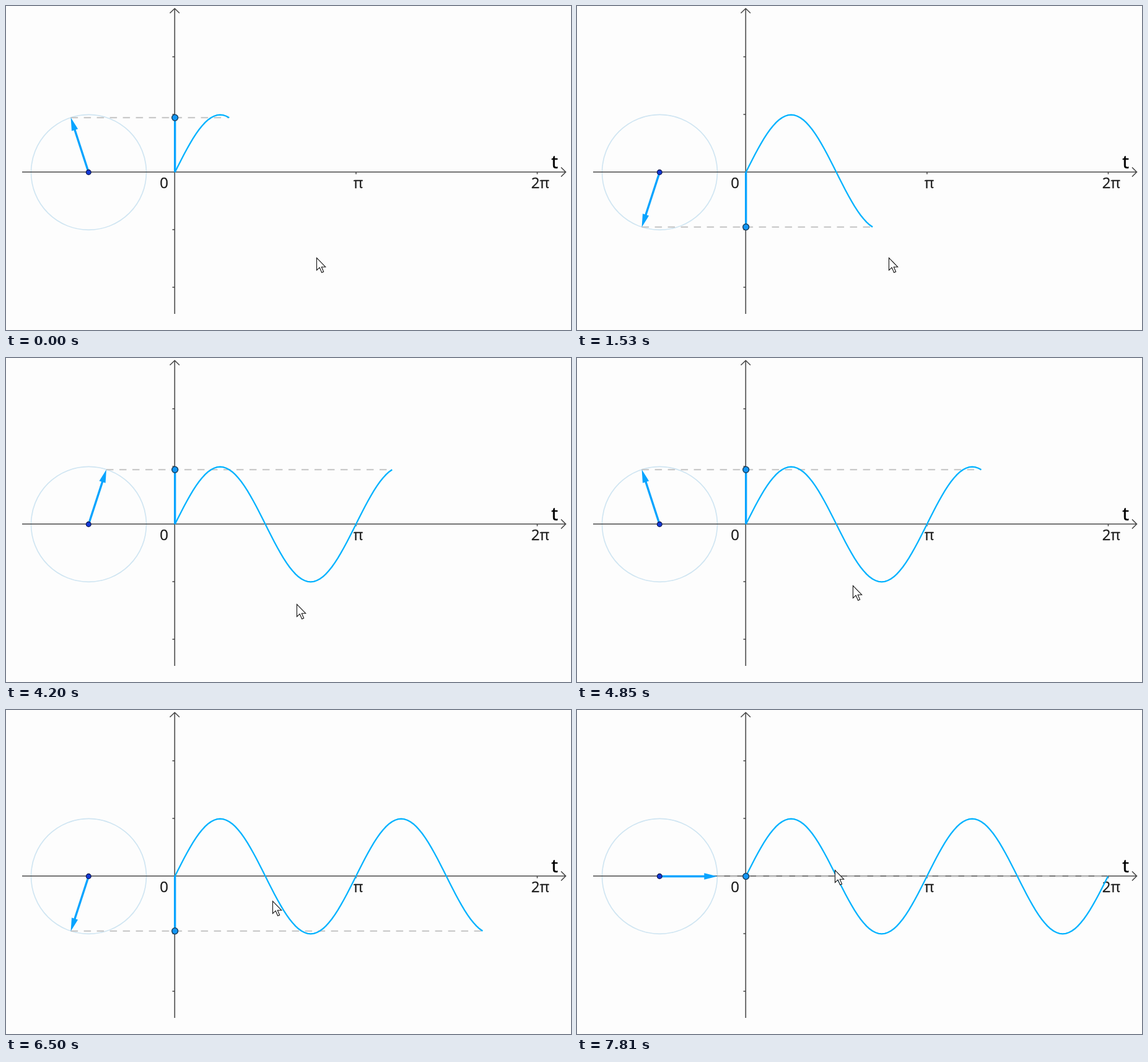
Animation of 912 by 523 pixels, one loop 8 s. Source, as an HTML page:

```html
<!DOCTYPE html>
<html lang="en">
<head>
<meta charset="utf-8">
<title>Rotating vector and sine</title>
<style>
  html, body { margin: 0; width: 100%; height: 100%; overflow: hidden; background: #fdfdfd; }
  svg { display: block; width: 912px; height: 523px; }
  text {
    font: 24px "Open Sans", "Noto Sans", sans-serif; text-anchor: middle;
    fill: #1c1c1c; stroke: #1c1c1c; stroke-width: .3;
  }
  .axes { stroke: #484848; stroke-width: 1.6; fill: none; }
  .blue { stroke: #08a4ff; stroke-width: 3.4; fill: none; }
</style>
</head>
<body>
<svg viewBox="0 0 912 523">
  <circle cx="133.5" cy="268.4" r="93" fill="none" stroke="#cfe5f2" stroke-width="1.6"/>
  <path class="axes" d="M26 268H903M896 260.5L903.5 268L896 275.5M272.3 497V4M264.5 11.5L272.3 4L280 11.5
    M268.5 82H272M268.5 175H272M268.5 361H272M268.5 454H272M565 268V271.5M857.5 268V271.5"/>
  <text x="255" y="294">0</text>
  <text x="568.5" y="294">π</text>
  <text x="862.5" y="294">2π</text>
  <text x="885.5" y="262" style="font-size:29px;fill:#000;stroke:#000;stroke-width:.7">t</text>
  <line id="dash" stroke="#c4c4c4" stroke-width="1.8" stroke-dasharray="11.5 9.5"/>
  <polyline id="wave" fill="none" stroke="#00b2ff" stroke-width="2.3" stroke-linejoin="round"/>
  <line id="bar" class="blue" x1="272.7" x2="272.7" y1="268"/>
  <g id="arrow">
    <path class="blue" d="M0 0H75"/>
    <path d="M93 0L72 -5.3V5.3Z" fill="#08a4ff"/>
  </g>
  <circle cx="133.3" cy="268.4" r="3.9" fill="#1238d8" stroke="#141c50" stroke-width="1.3"/>
  <circle id="dot" cx="272.7" r="4.9" fill="#1497f5" stroke="#153f60" stroke-width="1.5"/>
  <path id="cursor" d="M.5 .5V20.5L5.2 16.2L8.7 24.3L11.7 23L8.3 15.2H14.7Z"
    fill="#fff" stroke="#111" stroke-width="1.1"/>
</svg>
<script>
  const LOOP = 8000, CX = 133.3, CY = 268.5, R = 92.8, X0 = 272.6, PERIOD = 292.2;
  const $ = id => document.getElementById(id);
  const set = (id, attrs) => {
    for (const k in attrs) $(id).setAttribute(k, attrs[k]);
  };

  // Pointer strokes; it rests in between
  const moves = [
    { at: 0, dur: 170, to: [503, 406] },
    { at: 3000, dur: 250, to: [504, 404] },
    { at: 3740, dur: 460, to: [469, 397] },
    { at: 4200, dur: 340, to: [445, 367] },
    { at: 5950, dur: 790, to: [423, 282] },
    { at: 7110, dur: 190, to: [419, 269] },
    { at: 7300, dur: 510, to: [416, 258] }
  ];

  function pointer(t) {
    let pos = [501, 406];
    for (const { at, dur, to } of moves) {
      const k = Math.min(1, Math.max(0, (t - at) / dur));
      pos = pos.map((v, i) => v + (to[i] - v) * k);
    }
    return pos.map(Math.round);
  }

  // The vector jumps a tenth of a turn per beat; beats slowly close up.
  const beat = n => 20 + 503 * n - 0.063 * n ** 3;

  function stepAt(t) {
    let n = 0;
    while (beat(n) <= t) n++;
    return 3 + n;
  }

  const waveY = turn => CY - R * Math.sin(turn * 2 * Math.PI);

  function pose(step) {
    const turn = step / 10, y = waveY(turn), pts = [];
    for (let i = 0; i <= step * 6; i++) {
      const u = i / 60;
      pts.push((X0 + PERIOD * u).toFixed(2) + "," + waveY(u).toFixed(2));
    }
    set("wave", { points: pts.join(" ") });
    set("arrow", { transform: `translate(${CX} ${CY}) rotate(${-turn * 360})` });
    set("dash", { x1: CX + R * Math.cos(turn * 2 * Math.PI), x2: X0 + PERIOD * turn, y1: y, y2: y });
    set("bar", { y2: y });
    set("dot", { cy: y });
  }

  function draw(now) {
    const t = now % LOOP;
    pose(stepAt(t));
    set("cursor", { transform: `translate(${pointer(t)})` });
    requestAnimationFrame(draw);
  }
  draw(0);
</script>
</body>
</html>
```
